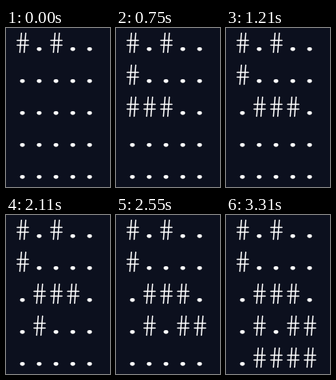
An HTML page with a canvas that plays this animation: 130 by 199 pixels, repeating every 6180 ms.

```html
<!DOCTYPE html>
<html lang="en">
<head>
<meta charset="utf-8">
<title>Falling blocks on a character grid</title>
<style>
  html, body { margin: 0; width: 100%; height: 100%; overflow: hidden; background: #0c101e; }
  canvas { display: block; }
</style>
</head>
<body>
<canvas id="stage" width="130" height="199"></canvas>
<script>
const LOOP = 6180;
const CELL = { width: 21, height: 40, left: 10 };

// Each step replaces one row of the grid at the given time.
const steps = [
  { at: 0, row: 0, cells: "#.#.." },
  { at: 320, row: 1, cells: "#...." },
  { at: 750, row: 2, cells: "###.." },
  { at: 1210, row: 2, cells: ".###." },
  { at: 1650, row: 3, cells: "#...." },
  { at: 2110, row: 3, cells: ".#..." },
  { at: 2550, row: 3, cells: ".#.##" },
  { at: 2850, row: 4, cells: "####." },
  { at: 3310, row: 4, cells: ".####" },
];

const hash = new Path2D("M9.3 6.5L7.3 30.5M14.7 6.5L12.7 30.5M4 15.5H18M4 21.5H18");
const ctx = document.getElementById("stage").getContext("2d");
ctx.strokeStyle = ctx.fillStyle = "#fff";
ctx.lineWidth = 1.5;
ctx.lineCap = "round";

function drawCell(symbol, column, row) {
  ctx.save();
  ctx.translate(CELL.left + column * CELL.width, row * CELL.height);
  if (symbol === "#") {
    ctx.stroke(hash);
  } else {
    ctx.beginPath();
    ctx.ellipse(10.5, 26.3, 2.9, 2.4, 0, 0, 2 * Math.PI);
    ctx.fill();
  }
  ctx.restore();
}

function gridAt(time) {
  const grid = Array(5).fill(".....");
  for (const { at, row, cells } of steps) {
    if (at <= time) grid[row] = cells;
  }
  return grid;
}

const start = performance.now();
function draw() {
  const time = Math.max(0, performance.now() - start) % LOOP;
  ctx.clearRect(0, 0, 130, 199);
  gridAt(time).forEach((cells, row) =>
    [...cells].forEach((symbol, column) => drawCell(symbol, column, row)));
  requestAnimationFrame(draw);
}
draw();
</script>
</body>
</html>
```
